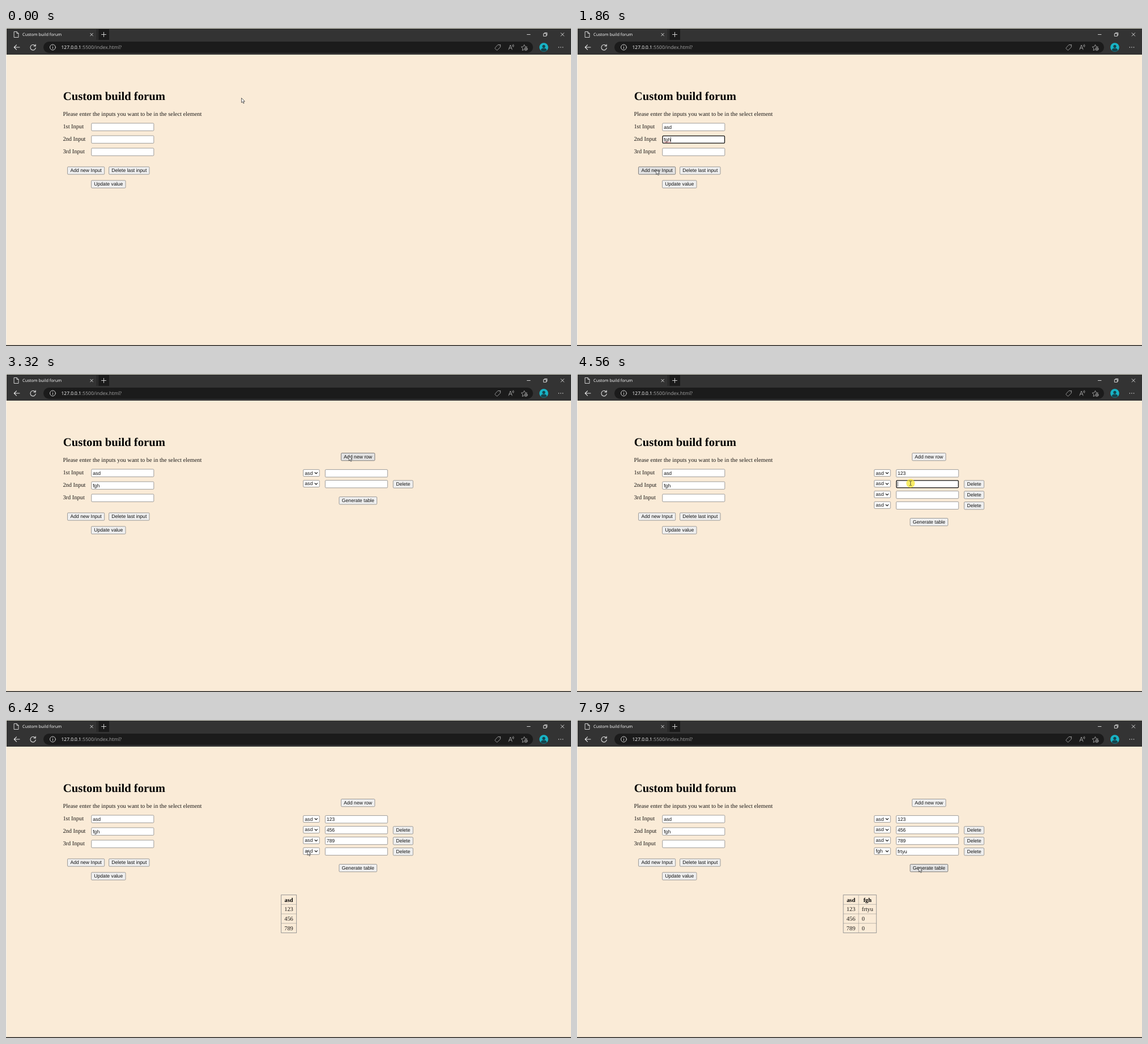
These frames come from a looping animation (997x561 px, 7.99 s). An HTML page:

```html
<!DOCTYPE html>
<html lang="en">
<head>
<meta charset="utf-8">
<title>Custom build forum</title>
<style>
html, body { margin: 0; width: 100%; height: 100%; overflow: hidden; background: #faebd7; }
svg { display: block; width: 100vw; height: 100vh; }
text { text-rendering: geometricPrecision; white-space: pre; }
.serif { font: 10.4px "Liberation Serif", "Times New Roman", serif; fill: #1c1a18; }
.head { font: bold 20.65px "Liberation Serif", "Times New Roman", serif; fill: #000; }
.bold { font-weight: bold; fill: #000; }
.ctl { font: 8.67px "Liberation Sans", Arial, sans-serif; fill: #111; }
.bar { font-family: "Open Sans", "Noto Sans", sans-serif; }
.icon { fill: none; stroke: #e4e4e4; stroke-width: .9; stroke-linecap: round; stroke-linejoin: round; }
</style>
</head>
<body>
<svg viewBox="0 0 997 561" xmlns="http://www.w3.org/2000/svg">
  <rect width="997" height="561" fill="#faebd7"/>
  <g id="chrome">
    <rect width="997" height="47" fill="#333"/>
    <rect width="997" height="1" fill="#dcdccf"/>
    <rect y="1" width="1" height="559" fill="#f4f1ea"/>
    <rect y="559.6" width="997" height="1.4" fill="#151515"/>
    <rect x="160.4" y="2" width=".8" height="19" fill="#161616"/>
    <rect x="163" y="2" width="19" height="19" fill="#1b1b1b"/>
    <rect x="66" y="24" width="864" height="20" rx="10" fill="#1b1b1b"/>
    <text class="bar" x="29" y="14" font-size="7.4" fill="#fff">Custom build forum</text>
    <text class="bar" x="97.6" y="37" font-size="8.35" fill="#fff">127.0.0.1</text>
    <text class="bar" x="133" y="37" font-size="8.55" fill="#a5a5a5">:5500/index.html?</text>
    <g class="icon">
      <path d="M14.5 6.5h4.5l3 3v7h-7.5zM19 6.5v3h3"/>
      <path d="M148.8 9.3l4.6 4.6m0-4.6l-4.6 4.6M168.5 11.5h8m-4-4v8"/>
      <path d="M24 34H14.3m4.2-4.2L14.3 34l4.2 4.2" stroke-width="1.1"/>
      <path d="M51.5 31.5a4.7 4.7 0 1 0 .8 3.6M52.2 29v3h-3.2" stroke-width="1.1"/>
      <circle cx="82.5" cy="34" r="4.9"/><path d="M82.5 33.6v2.8m0-4.9v.1"/>
      <g stroke="#b5b5b5" stroke-width=".8">
        <path d="M868.5 29.5h4v4l-5.3 5.3q-.8.6-1.6 0l-2.4-2.4q-.7-.8 0-1.6zM870.5 31.4v.1"/>
        <path d="M887 38l3-8 3 8m-5-2.6h4M893.6 30q1 1 0 2.5m1.7-3.5q1.8 2 0 4.5"/>
        <path d="M914 38.2l-2.8 1.4.6-3.7-2.6-2.6 3.7-.5 1.6-3.4 1.6 3.4 3.3.5"/>
        <circle cx="917.4" cy="37" r="2.7"/><path d="M916 37h2.8m-1.4-1.4v2.8"/>
      </g>
      <path d="M919.5 11.5h5.5M948.8 9.8h4.6v4.6h-4.6zM950.3 9.6v-1.2h4.5v4.5h-1.2M979.2 8.7l5.4 5.4m0-5.4l-5.4 5.4"/>
      <path d="M975.3 34h.1m3.5 0h.1m3.5 0h.1" stroke-width="1.4"/>
    </g>
    <circle cx="949" cy="34" r="7.8" fill="#18b4c6"/>
    <path d="M943.8 39.6q0-4 5.2-4t5.2 4q-5.2 4-10.4 0z" fill="#15454e"/>
    <circle cx="949" cy="32.4" r="2.6" fill="#15454e"/>
  </g>
  <text class="head" x="100.8" y="126.5">Custom build forum</text>
  <text class="serif" x="100.4" y="155">Please enter the inputs you want to be in the select element</text>
  <g id="form"></g>
  <g id="pointer"></g>
</svg>
<script>
const LOOP = 7990, REACT = 30, PRESS = 80, PAUSE = 130, KEY = 75;
const form = document.getElementById('form');
const pointer = document.getElementById('pointer');
const pen = document.createElement('canvas').getContext('2d');
pen.font = '8.67px "Liberation Sans", Arial, sans-serif';

// What the user does: time, control, typed text
const steps = [
  { at: 740, on: 'input0', text: 'asd' },
  { at: 1230, on: 'input1', text: 'fgh' },
  { at: 1840, on: 'addInput', aim: .48, hover: true },
  { at: 2270, on: 'update' },
  { at: 3230, on: 'addRow' },
  { at: 3440, on: 'addRow' },
  { at: 3660, on: 'addRow' },
  { at: 4010, on: 'cell0', text: '123' },
  { at: 4515, on: 'cell1', text: '456' },
  { at: 5150, on: 'cell2', text: '789' },
  { at: 5810, on: 'generate', aim: .45 },
  { at: 6470, on: 'select3' },
  { at: 6820, on: 'option1' },
  { at: 7200, on: 'cell3', text: 'frtyu' },
  { at: 7840, on: 'generate' }
];

// Boxes of all controls when the right panel has this many rows
function layout(rows) {
  const at = (x, y, w, h = 13.3) => ({ x, y, w, h });
  const all = {
    addInput: at(108.5, 244.9, 65.2),
    deleteInput: at(181.6, 244.9, 71.4),
    update: at(150.5, 268.9, 60.5)
  };
  for (let i = 0; i < 3; i++) all['input' + i] = at(150.8, 168 + 22 * i, 110);
  for (let i = 0; i < rows; i++) {
    const y = 168.6 + 18.9 * i;
    all['select' + i] = at(524.5, y, 28.6, 12);
    all['cell' + i] = at(563.3, y, 110);
    if (i) all['delete' + i] = at(683.2, y + .3, 35);
  }
  if (rows) {
    all.addRow = at(591.4, 139.5, 59.4);
    all.generate = at(587.9, 178.9 + 18.9 * rows, 66.6);
  }
  for (let i = 0; i < 2; i++) all['option' + i] = at(524.5, 239.3 + 13 * i, 28.4, 13);
  return all;
}

const labels = {
  addInput: 'Add new Input', deleteInput: 'Delete last input', update: 'Update value',
  addRow: 'Add new row', generate: 'Generate table', delete: 'Delete'
};
const full = layout(4);

// Columns per select value, short ones padded with 0
function collect(s) {
  const cols = {};
  for (let i = 0; i < s.rows; i++) {
    const value = s.text['cell' + i];
    if (value) (cols[s.choice[i]] ??= []).push(value);
  }
  const size = Math.max(...Object.values(cols).map(c => c.length));
  return Object.entries(cols).map(([name, c]) => [name, ...c, ...Array(size - c.length).fill('0')]);
}

function stateAt(t) {
  const s = { rows: 0, text: {}, choice: Array(4).fill('asd'), focus: '', open: false, table: null };
  for (const { at, on, text, hover } of steps) {
    if (t < at + REACT) break;
    if (hover) continue;
    s.focus = on;
    s.open = on === 'select3';
    if (text) s.text[on] = text.slice(0, Math.max(0, Math.floor((t - at - PAUSE) / KEY)));
    if (on === 'update') s.rows = 1;
    if (on === 'addRow') s.rows++;
    if (on === 'generate') s.table = collect(s);
    if (on === 'option1') {
      s.choice[3] = 'fgh';
      s.focus = 'select3';
    }
  }
  return s;
}

function aimOf({ on, aim = .23 }) {
  const b = full[on];
  return { x: b.x + b.w * aim, y: b.y + b.h * .4 };
}

function pointAt(t) {
  let from = { x: 415.5, y: 123.5 }, leave = 60;
  for (const step of steps) {
    const to = aimOf(step), arrive = step.at - 20;
    if (t < arrive) {
      const u = Math.max(0, (t - leave) / (arrive - leave));
      const e = u * u * (3 - 2 * u);
      return { x: from.x + (to.x - from.x) * e, y: from.y + (to.y - from.y) * e };
    }
    from = to;
    leave = step.at + PAUSE + KEY * (step.text || '').length;
  }
  return from;
}

const label = (cls, x, y, s, extra = '') => `<text class="${cls}" x="${x}" y="${y}" ${extra}>${s}</text>`;
const rect = ({ x, y, w, h }, fill, stroke, sw = .7, rx = 1.4) =>
  `<rect x="${x}" y="${y}" width="${w}" height="${h}" rx="${rx}" fill="${fill}" stroke="${stroke}" stroke-width="${sw}"/>`;
const line = (d, stroke, sw = .7) => `<path d="${d}" fill="none" stroke="${stroke}" stroke-width="${sw}"/>`;
const inside = (p, b) => p.x >= b.x && p.x <= b.x + b.w && p.y >= b.y && p.y <= b.y + b.h;
const frame = (b, focus) => focus
  ? rect({ x: b.x + .3, y: b.y + .3, w: b.w - .6, h: b.h - .5 }, '#fff', '#101010', 1.3)
  : rect(b, '#fff', '#767676');

function button(b, s, hot) {
  return rect(b, hot ? '#e2e2e2' : '#efefef', hot ? '#4f4f4f' : '#767676') +
    label('ctl', b.x + b.w / 2, b.y + 9.3, s, 'text-anchor="middle"');
}

function field(b, s, focus) {
  let out = frame(b, focus) + label('ctl', b.x + 2.4, b.y + 9.6, s);
  if (!focus) return out;
  const width = pen.measureText(s).width;
  out += line(`M${b.x + 2.7 + width} ${b.y + 2.3}v9`, '#111');
  if (s === 'fgh') out += line(`M${b.x + 2.6} ${b.y + 11.4}q1 -1.4 2 0${'t2 0'.repeat(5)}`, '#e33', .6);
  return out;
}

function select(b, s, focus) {
  return frame(b, focus) + label('ctl', b.x + 2.8, b.y + 8.9, s) +
    line(`M${b.x + 20.2} ${b.y + 4.8}l2.5 2.5 2.5-2.5`, '#111', 1.2);
}

function popup(p) {
  const hot = p.y > full.option1.y ? 1 : 0;
  return ['asd', 'fgh'].map((s, i) => {
    const b = full['option' + i];
    return rect(b, i === hot ? '#1967d2' : '#fff', '#767676', .4, 0) +
      label('ctl', b.x + 2.8, b.y + 9.4, s, i === hot ? 'style="fill:#fff"' : '');
  }).join('');
}

function table(cols) {
  const top = 308.6, step = 16.7, height = step * cols[0].length;
  const widths = cols.map((_, i) => 27 + 4.3 * i);
  const w = widths.reduce((a, b) => a + b);
  let x = 499.1 - w / 2, out = '';
  for (let i = 1; i < cols[0].length; i++) out += line(`M${x} ${top + i * step}h${w}`, '#aaa49c');
  out += rect({ x, y: top, w, h: height }, 'none', '#8f8f8f', .9, 0);
  cols.forEach((col, c) => {
    if (c) out += line(`M${x} ${top}v${height}`, '#aaa49c');
    col.forEach((s, i) => {
      const y = top + i * step + 12;
      out += i ? label('serif', x + 5.6, y, s) : label('serif bold', x + widths[c] / 2, y, s, 'text-anchor="middle"');
    });
    x += widths[c];
  });
  return out;
}

function drawPointer(p, t, typing) {
  const pressed = steps.some(s => !s.hover && t >= s.at && t < s.at + PRESS);
  const glow = pressed ? `<circle cx="${p.x}" cy="${p.y}" r="7.6" fill="#f5e62c" opacity=".72"/>` : '';
  const shape = typing
    ? line('M-2.2 -4q1.8 0 2.2 .8q.4 -.8 2.2 -.8M0 -3.2v6.4M-2.2 4q1.8 0 2.2 -.8q.4 .8 2.2 .8', '#333', .8)
    : '<path d="M0 0v8.2l1.9-1.8 1.4 3.1 1.4-.6-1.4-3h2.6z" fill="#fff" stroke="#222" stroke-width=".7"/>';
  return `${glow}<g transform="translate(${p.x} ${p.y})">${shape}</g>`;
}

function render(t) {
  const p = pointAt(t), s = stateAt(t);
  let typing = false;
  let out = ['1st', '2nd', '3rd'].map((n, i) => label('serif', 100.4, 177.4 + 22 * i, n + ' Input')).join('');
  for (const [name, b] of Object.entries(layout(s.rows))) {
    const kind = name.replace(/\d/, ''), focus = s.focus === name, over = inside(p, b);
    if (kind === 'input' || kind === 'cell') {
      out += field(b, s.text[name] || '', focus);
      typing ||= over;
    } else if (kind === 'select') out += select(b, s.choice[name.slice(-1)], focus);
    else if (kind !== 'option') out += button(b, labels[kind], over);
  }
  if (s.table) out += table(s.table);
  if (s.open) out += popup(p);
  form.innerHTML = out;
  pointer.innerHTML = drawPointer(p, t, typing);
}

let origin;
function tick(now) {
  origin ??= now;
  render((now - origin) % LOOP);
  requestAnimationFrame(tick);
}
render(0);
requestAnimationFrame(tick);
</script>
</body>
</html>
```
